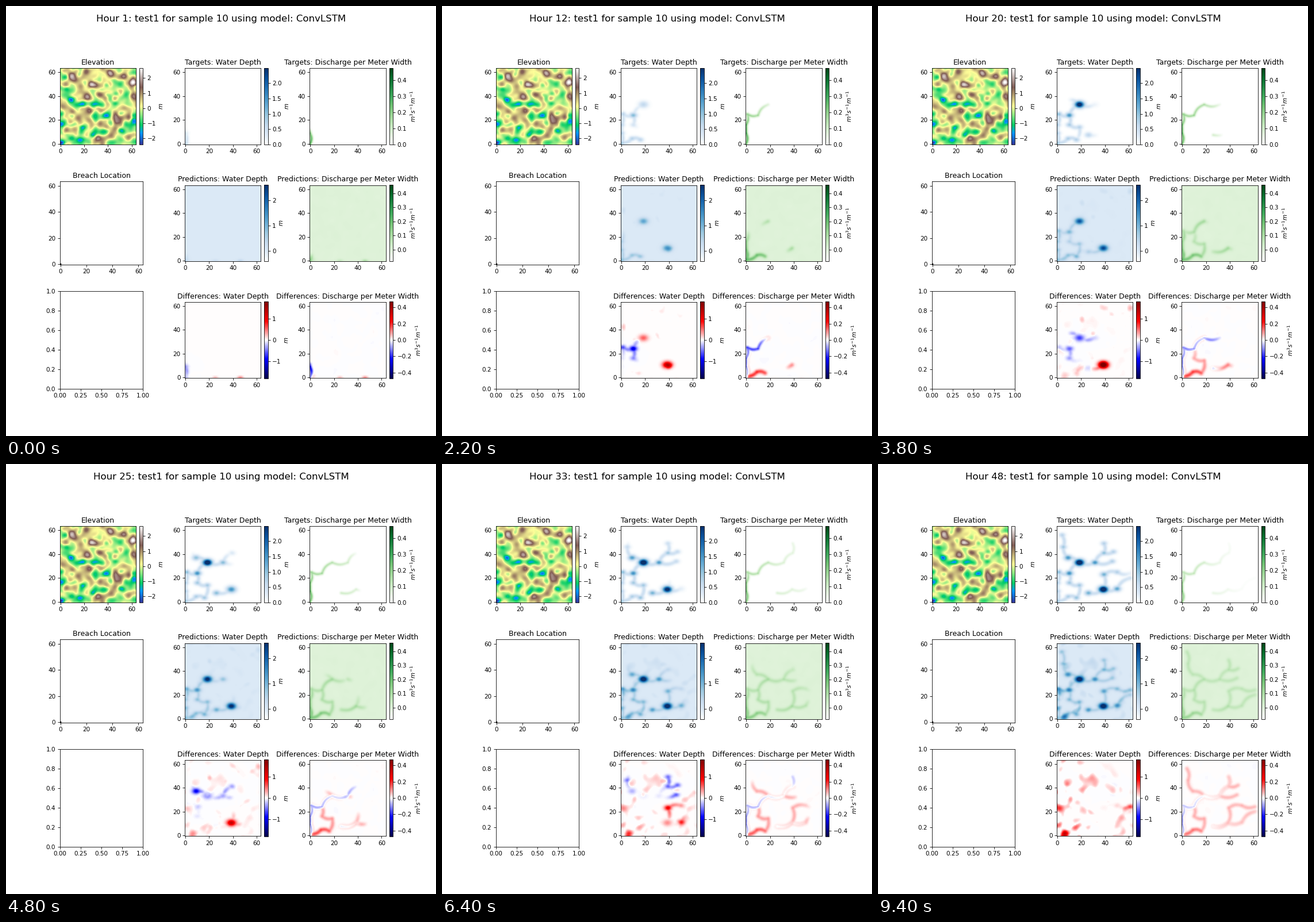
A matplotlib script for the animation above (9600 ms loop, 748 by 748 pixels).

```python
import numpy as np
import matplotlib.pyplot as plt
from matplotlib.animation import FuncAnimation
from matplotlib.colors import LinearSegmentedColormap

N, HOURS, STEP_MS = 64, 48, 200
yy, xx = np.mgrid[:N, :N].astype(float)
rng = np.random.default_rng(10)

# Basins along a river, then (first, last) arrival hour for target and prediction.
RIVERS = [
    ([(0, 0), (0, 9), (0, 16), (1, 25)], (-8, 8), (-3, 11)),
    ([(1, 25), (10, 24), (18.5, 33)], (6, 10), (18, 8)),
    ([(18.5, 33), (31.5, 33), (39, 41), (39, 49)], (12, 28), (17, 35)),
    ([(26, 7.5), (38.5, 10.5)], (16, 21), (17, 7)),
    ([(38.5, 10.5), (50, 11), (61, 20)], (21, 44), (15, 42)),
]
# Branches fill up but carry no visible target discharge.
BRANCHES = [
    ([(31.5, 33), (46, 34)], (20, 27), (20, 36)),
    ([(39, 41), (47, 42)], (22, 27), (30, 38)),
    ([(18.5, 33), (9, 37), (5, 46), (4, 56)], (10, 38), (20, 38)),
    ([(0, 1), (9, 4.5), (16, 3.5)], (0, 4), (-1, 3)),
    ([(16, 3.5), (18.5, 14), (10, 16), (10, 24)], (18, 5), (11, 18)),
    ([(38.5, 10.5), (39, 23), (50, 25), (61, 24)], (28, 46), (20, 35)),
]
DEEPEST = [(18.5, 33), (38.5, 10.5)]
HILLS = [(3.5, 11), (32, 5), (47, 18), (61, 40), (61, 51), (53, 58), (25, 28),
         (31, 42), (23, 39), (10, 56), (25, 49), (20, 60), (41, 60)]


def blob(x, y, rx, ry):
    return np.exp(-((xx - x) / rx) ** 2 - ((yy - y) / ry) ** 2)


def smooth_noise(width):
    f = np.hypot(np.fft.fftfreq(N)[:, None], np.fft.fftfreq(N))
    z = np.fft.ifft2(np.fft.fft2(rng.normal(size=(N, N))) * np.exp(-(f * width) ** 2)).real
    return z / z.std()


def basin_depth(x, y):
    """Basins get deeper near the two deepest points."""
    d = min(np.hypot(x - a, y - b) for a, b in DEEPEST)
    return 0.7 + 1.65 * np.exp(-(d / 12) ** 2)


def basin(x, y):
    r = 1.8 + 0.6 * basin_depth(x, y)
    return blob(x, y, 1.2 * r, 0.85 * r)


def river_course(points):
    """Basin positions and channel positions, each with its share of the length."""
    p = np.array(points, float)
    legs = np.hypot(*np.diff(p, axis=0).T)
    marks = np.r_[0, np.cumsum(legs)] / legs.sum()
    channel = []
    for k, leg in enumerate(legs):
        dx, dy = p[k + 1] - p[k]
        bow = 0.13 * (-1) ** k
        for u in np.linspace(0, 1, int(leg) + 2):
            side = bow * np.sin(np.pi * u)
            x, y = p[k, 0] + u * dx + side * dy, p[k, 1] + u * dy - side * dx
            channel.append((max(x, 0), y, marks[k] + u * (marks[k + 1] - marks[k])))
    return list(zip(p[:, 0], p[:, 1], marks)), channel


class Layer:
    """Blobs that rise after their start and then fade."""

    def __init__(self):
        self.shapes, self.rules = [], []

    def add(self, shape, amount, start, rise, fade=1e4):
        self.shapes.append(shape.ravel() ** 3)
        self.rules.append((amount, start, rise, fade))

    def freeze(self):
        self.shapes = np.array(self.shapes)
        self.rules = np.array(self.rules).T

    def at(self, t):
        amount, start, rise, fade = self.rules
        age = np.maximum(t - start, 0)
        w = amount * (1 - np.exp(-age / rise)) * np.exp(-age / fade)
        return np.cbrt(w ** 3 @ self.shapes).reshape(N, N)


def build():
    depth, flow = (Layer(), Layer()), (Layer(), Layer())
    for river in RIVERS + BRANCHES:
        basins, channel = river_course(river[0])
        for k, (first, last) in enumerate(river[1:]):
            for x, y, s in basins:
                depth[k].add(basin(x, y), basin_depth(x, y), first + s * (last - first), 4)
            for x, y, s in channel:
                start = first + s * (last - first)
                late = max(start, 0)
                depth[k].add(blob(x, y, 1.7, 1.7), 0.45, start, 3)
                # target discharge weakens downstream, predicted discharge lingers
                if k:
                    flow[1].add(blob(x, y, 1.7, 1.7), 0.06 + 0.12 * np.exp(-late / 8), start, 2, 90)
                elif river in RIVERS:
                    flow[0].add(blob(x, y, 1.2, 1.2), 0.28 * np.exp(-late / 20), start, 2,
                                120 * np.exp(-late / 12))
    # short-lived traces along the lower edge
    for x in (25, 46):
        trace = blob(x, 0, 2.5, 1.2)
        depth[1].add(trace, x / 42, -3, 2, 4)
        flow[1].add(trace, x / 170, -3, 2, 4)
    for layer in depth + flow:
        layer.freeze()
    return depth, flow


def terrain():
    z = 0.2 + 0.55 * smooth_noise(9)
    for x, y in HILLS:
        z += 1.7 * blob(x, y, 3.4, 3.4)
    for x, y in {p for river in RIVERS + BRANCHES for p in river[0]}:
        z -= (0.4 + 0.65 * basin_depth(x, y)) * basin(x, y)
    return z


def white_start(name):
    colors = plt.get_cmap(name)(np.linspace(0, 1, 9))
    colors[0] = 1
    return LinearSegmentedColormap.from_list(name + "_white", colors)


def panel(ax, title, cmap, low, high, label):
    im = ax.imshow(np.zeros((N, N)), cmap=cmap, vmin=low, vmax=high, origin="lower")
    ax.set_title(title)
    fig.colorbar(im, ax=ax, fraction=0.046, pad=0.04, label=label)
    return im


elevation = terrain()
depth, flow = build()
noise = [smooth_noise(9) for _ in range(2)]
stray = np.maximum(smooth_noise(11) - 0.7, 0) * np.clip(1.2 - (xx + yy) / 90, 0, 1)

fig, axs = plt.subplots(3, 3, figsize=(10, 10), dpi=74.8)
fig.subplots_adjust(left=0.125, right=0.9, bottom=0.11, top=0.88, wspace=0.5, hspace=0.2)
heading = fig.suptitle("", fontsize=16)

M, Q = "$m$", "$m^3s^{-1}m^{-1}$"
blues, greens = white_start("Blues"), white_start("Greens")
panel(axs[0, 0], "Elevation", "terrain", -2.41, 2.67, M).set_data(elevation)
breach = np.zeros((N, N))
breach[0, 0] = 1
axs[1, 0].imshow(breach, cmap="binary", origin="lower")
axs[1, 0].set_title("Breach Location")

water, discharge = "Water Depth", "Discharge per Meter Width"
views = [
    panel(axs[0, 1], "Targets: " + water, blues, 0, 2.495, M),
    panel(axs[1, 1], "Predictions: " + water, blues, -0.42, 2.6, M),
    panel(axs[2, 1], "Differences: " + water, "seismic", -1.82, 1.82, M),
    panel(axs[0, 2], "Targets: " + discharge, greens, 0, 0.477, Q),
    panel(axs[1, 2], "Predictions: " + discharge, greens, -0.084, 0.461, Q),
    panel(axs[2, 2], "Differences: " + discharge, "seismic", -0.469, 0.469, Q),
]


def update(i):
    heading.set_text(f"Hour {i + 1}: test1 for sample 10 using model: ConvLSTM")
    ripple = noise[0] * np.cos(i / 8) + noise[1] * np.sin(i / 8)
    specks = 0.15 * np.maximum(ripple - 1.7, 0) * min(i / 10, 1)
    puddles = 0.6 * stray * np.clip((i - 15) / 30, 0, 1)
    d0, q0 = depth[0].at(i), flow[0].at(i)
    d1 = depth[1].at(i) + specks + puddles
    q1 = flow[1].at(i) + 0.0015 * ripple
    for view, data in zip(views, (d0, d1, d1 - d0, q0, q1, q1 - q0)):
        view.set_data(data)
    return [heading, *views]


anim = FuncAnimation(fig, update, frames=HOURS, interval=STEP_MS, repeat=True, repeat_delay=0)
plt.show()
```
